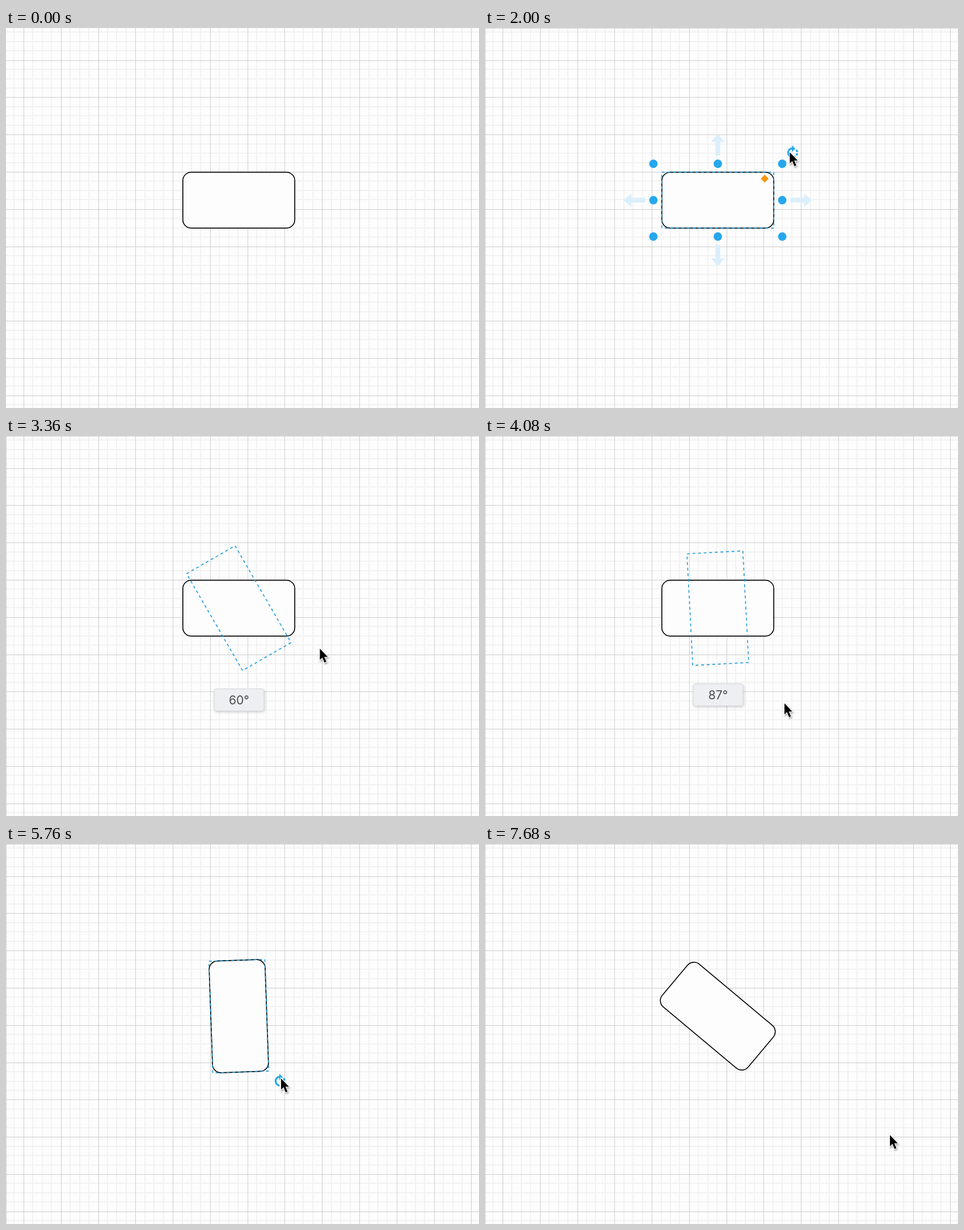
These frames come from a looping animation (834 by 671 pixels, 8160 ms). An HTML page:

```html
<!DOCTYPE html>
<html lang="en">
<head>
<meta charset="utf-8">
<title>Rotating a shape</title>
<style>
  html, body { margin: 0; width: 100%; height: 100%; overflow: hidden; background: #fdfdfd; }
  svg { display: block; }
  .outline { fill: none; stroke: #1f9bd7; stroke-width: 1.645; stroke-dasharray: 4.935; }
  .blue { fill: #26a7ed; }
  .label { filter: drop-shadow(1px 2px 2px rgba(0, 0, 0, .16)); }
  .label text { font: 21px Inter, "Open Sans", sans-serif; fill: #4b4b4b; text-anchor: middle; }
  .cursor { filter: drop-shadow(1px 2px 1.5px rgba(0, 0, 0, .35)); }
</style>
</head>
<body>
<svg width="834" height="671" viewBox="0 0 834 671">
  <path id="minor" stroke="#f2f2f2" stroke-width="2"/>
  <path id="major" stroke="#cdcdcd"/>
  <path id="edge" d="M.5 0V671M0 .5H834" stroke="#d4d4d4"/>
  <rect id="box" x="-98.7" y="-49.35" width="197.4" height="98.7" rx="14.8"
        fill="#fdfdfd" stroke="#000" stroke-width="1.645"/>
  <g id="arrows" fill="#daeffb"></g>
  <rect id="outline" class="outline" x="-98.7" y="-49.35" width="197.4" height="98.7"/>
  <g id="handles" class="blue"></g>
  <path id="diamond" d="M0-7L7 0 0 7-7 0Z" fill="#f6960f"/>
  <g id="spin">
    <path id="ring" fill="none" stroke="#26a7ed" stroke-width="3.3"/>
    <path class="blue" d="M-1.4-13L4.6-7-1.4-1.4Z"/>
  </g>
  <g id="label" class="label">
    <rect id="plate" y="0" height="39" rx="4" fill="#eeeff2" stroke="#d3d5d8"/>
    <text id="angle" y="27"></text>
  </g>
  <g id="cursor" class="cursor">
    <path d="M0 0V19.8L4.4 15.6 8.1 24.4 11.4 23 7.7 14.4H13.9Z"
          fill="#000" stroke="#fff" stroke-width="2.2" paint-order="stroke"/>
  </g>
</svg>
<script>
const LOOP = 8160, STEP = 80;
const CX = 410.5, CY = 304, HW = 98.7, HH = 49.35;
const $ = id => document.getElementById(id);
const rad = deg => deg * Math.PI / 180;
const show = (id, on) => $(id).setAttribute('display', on ? 'inline' : 'none');
const place = (el, x, y, deg = 0) =>
  el.setAttribute('transform', `translate(${x} ${y}) rotate(${deg})`);

function add(parent, tag, attrs) {
  const el = document.createElementNS('http://www.w3.org/2000/svg', tag);
  for (const k in attrs) el.setAttribute(k, attrs[k]);
  return parent.appendChild(el);
}

// Grid: every fourth line is a major one
function grid() {
  const cell = 65.8 / 4, d = ['', ''];
  for (let i = -4; i < 52; i++) {
    const main = i % 4 ? 0 : 1, nudge = main ? .5 : 0;
    const x = Math.floor(31.4 + i * cell) + nudge;
    const y = Math.floor(57.1 + i * cell) + nudge;
    if (x > 0) d[main] += `M${x} 0V671`;
    if (y > 0) d[main] += `M0 ${y}H834`;
  }
  $('minor').setAttribute('d', d[0]);
  $('major').setAttribute('d', d[1]);
}

function arc(from, to, r = 8) {
  const at = a => `${r * Math.cos(rad(a))} ${r * Math.sin(rad(a))}`;
  return `M${at(from)}A${r} ${r} 0 0 1 ${at(to)}`;
}

// Cursor path: time, x, y
const keys = [
  [160, 563, 667], [320, 561, 653], [400, 561, 653], [760, 493, 485],
  [1120, 414, 307], [1280, 414, 307], [2080, 541, 217], [2160, 541, 217],
  [2720, 559, 275], [3040, 558, 334], [3920, 537, 444], [4080, 528, 472],
  [4240, 526, 474], [4400, 526, 474], [5280, 489, 423], [5600, 485, 414],
  [5760, 485, 414], [6320, 575, 373], [6560, 605, 340], [6640, 608, 337],
  [7200, 714, 514], [LOOP, 714, 514]
];

function slope(i, axis) {
  const a = keys[i - 1], b = keys[i], c = keys[i + 1];
  if (!a || !c) return 0;
  const before = (b[axis] - a[axis]) / (b[0] - a[0]);
  const after = (c[axis] - b[axis]) / (c[0] - b[0]);
  return before * after <= 0 ? 0 : 2 * before * after / (before + after);
}

function cursorAt(t) {
  let i = 0;
  while (i < keys.length - 2 && t >= keys[i + 1][0]) i++;
  const a = keys[i], b = keys[i + 1], dt = b[0] - a[0];
  const u = Math.max(0, (t - a[0]) / dt), v = 1 - u;
  return [1, 2].map(k =>
    v * v * (1 + 2 * u) * a[k] + u * u * (3 - 2 * u) * b[k] +
    dt * u * v * (v * slope(i, k) - u * slope(i + 1, k)));
}

const drags = [
  { from: 2240, to: 4480, offset: 32, reach: 157 },
  { from: 5760, to: 6640, offset: 30.1, reach: 134.5 }
];

// Snapping gets finer as the pointer moves away from the handle's radius
function dragAngle(drag, x, y) {
  const far = Math.hypot(x - CX, y - CY) - drag.reach;
  const snap = far < 2 ? 15 : far < 25 ? 5 : 1;
  const deg = Math.atan2(y - CY, x - CX) * 180 / Math.PI + drag.offset;
  return Math.round(deg / snap) * snap;
}

function extent(deg) {
  const c = Math.abs(Math.cos(rad(deg))), s = Math.abs(Math.sin(rad(deg)));
  return [HW * c + HH * s, HW * s + HH * c];
}

function turned(x, y, deg) {
  const c = Math.cos(rad(deg)), s = Math.sin(rad(deg));
  return [CX + x * c - y * s, CY + x * s + y * c];
}

const dots = [], arrows = [];
for (let x = -1; x <= 1; x++)
  for (let y = -1; y <= 1; y++)
    if (x || y) dots.push({ x, y, el: add($('handles'), 'circle', { r: 7.4 }) });
for (let i = 0; i < 4; i++)
  arrows.push(add($('arrows'), 'path', { d: 'M0 0L12 14H4.3V38H-4.3V14H-12Z' }));

function draw(t) {
  const [px, py] = cursorAt(t);
  const drag = drags.find(d => t >= d.from && t < d.to);
  const turning = !!drag && t >= drag.from + STEP;
  const deg = t < 4480 ? 0 : t < 6640 ? 88 : 40;
  const selected = t >= 1120 && t < 7280;
  const tight = t >= 4480 && t < 6640;
  const gap = tight ? 0 : 14.9;
  const live = turning ? dragAngle(drag, px, py) : deg;

  show('edge', t >= 480);
  place($('box'), CX, CY, deg);
  place($('outline'), CX, CY, live);
  show('outline', selected);

  show('handles', selected && !drag);
  for (const p of dots) {
    const [x, y] = turned(p.x * (HW + gap), p.y * (HH + gap), deg);
    p.el.setAttribute('cx', x);
    p.el.setAttribute('cy', y);
  }
  show('diamond', selected && !drag);
  place($('diamond'), ...turned(HW - 16, -HH + 11.3, deg));
  show('spin', selected && !turning);
  place($('spin'), ...turned(HW + gap + 18.5, -HH - gap - 19.5, deg));

  show('arrows', (t >= 1120 && t < 2240) || (t >= 5440 && t < 5760));
  const [w, h] = extent(deg), out = tight ? 52.5 : 67.5;
  arrows.forEach((el, i) => {
    const a = rad(i * 90);
    place(el, CX + Math.sin(a) * (w + out), CY - Math.cos(a) * (h + out), i * 90);
  });

  show('label', turning);
  if (turning) {
    const text = live + '°';
    const width = 86 + (text.length - 3) * 12 + (live > 44 ? 2 : 0);
    $('angle').textContent = text;
    $('plate').setAttribute('x', -width / 2);
    $('plate').setAttribute('width', width);
    place($('label'), 411, Math.round(CY + extent(live)[1] + 32) + .5);
  }

  show('cursor', t >= 160);
  place($('cursor'), px, py);
}

grid();
$('ring').setAttribute('d', arc(97, 263) + arc(-39, -8) + arc(8, 37) + arc(53, 82));

function tick() {
  draw(Math.floor(performance.now() % LOOP / STEP) * STEP);
  requestAnimationFrame(tick);
}
tick();
</script>
</body>
</html>
```
